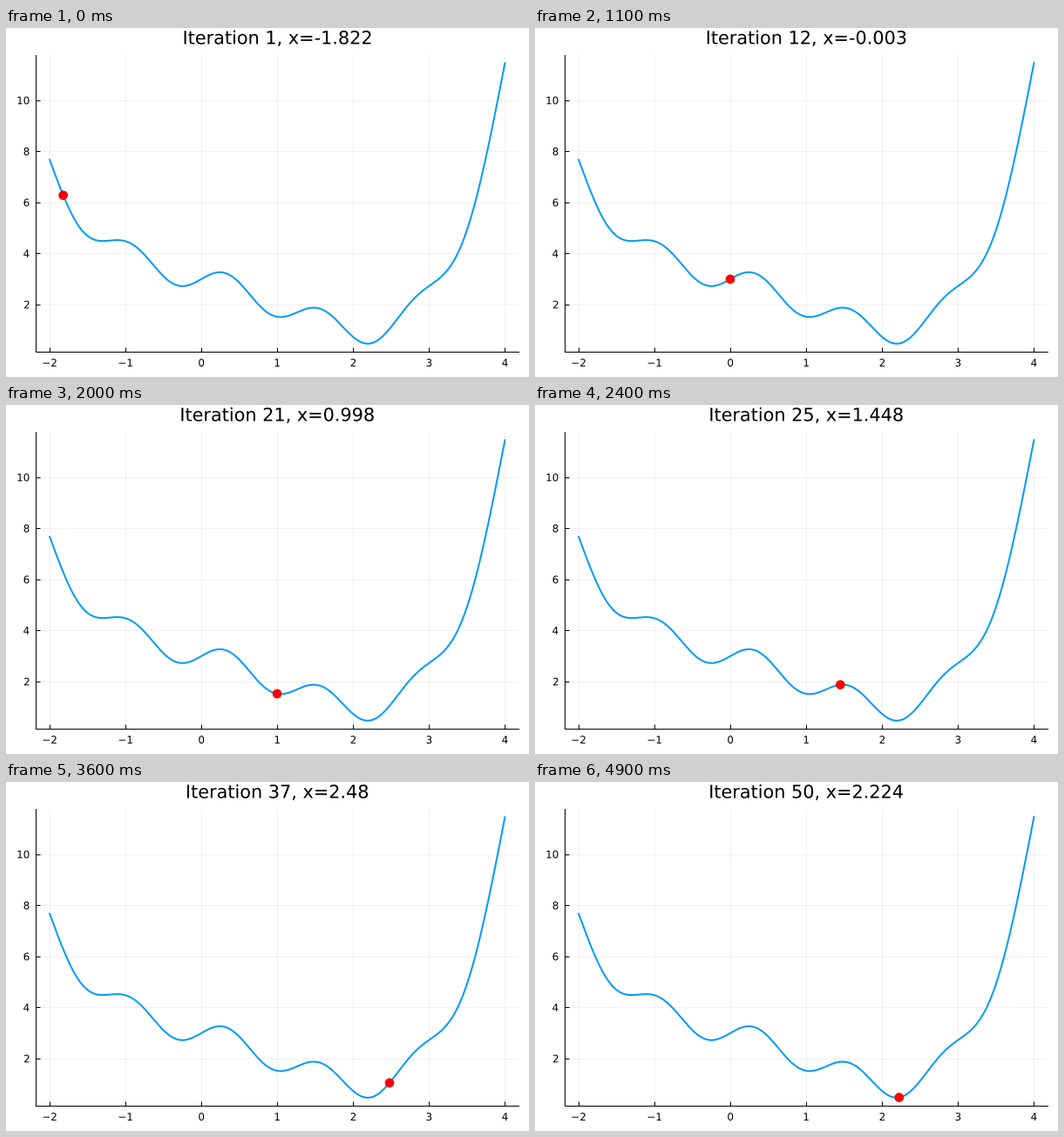
Write a matplotlib script that moves like this. It is 600 px wide and 400 px high and loops after 5000 ms.

```python
import numpy as np
import matplotlib.pyplot as plt
from matplotlib.animation import FuncAnimation
from matplotlib.patches import Ellipse, PathPatch
from matplotlib.textpath import TextPath
from matplotlib.transforms import Affine2D

WIDTH, HEIGHT, DPI = 600, 400, 100
PX = 72 / DPI  # one pixel in points
STEPS, INTERVAL = 50, 100
RATE, MOMENTUM, START = 0.01, 0.9, -1.9
LEFT, RIGHT, TOP, BOTTOM = 34.45, 588.05, 30.63, 371.43
TICK_SIZE, TITLE_SIZE, DOT_SIZE = 11.9, 20.8, 10.7


def f(x):
    return 0.1 * x**4 - 0.2 * x**3 - 0.1 * x**2 - 0.8 * x + 3 + 0.5 * np.sin(5 * x)


def slope(x):
    return 0.4 * x**3 - 0.6 * x**2 - 0.2 * x - 0.8 + 2.5 * np.cos(5 * x)


def descend():
    """Gradient descent with momentum; returns the position after each step."""
    x, v, path = START, 0.0, []
    for _ in range(STEPS):
        v = MOMENTUM * v - RATE * slope(x)
        x += v
        path.append(float(x))
    return path


def widen(values, share=0.03):
    low, high = values.min(), values.max()
    margin = share * (high - low)
    return low - margin, high + margin


fig = plt.figure(figsize=(WIDTH / DPI, HEIGHT / DPI), dpi=DPI, facecolor="white")
ax = fig.add_axes([LEFT / WIDTH, 1 - BOTTOM / HEIGHT,
                   (RIGHT - LEFT) / WIDTH, (BOTTOM - TOP) / HEIGHT])
pixels = Affine2D().scale(1 / WIDTH, -1 / HEIGHT).translate(0, 1) + fig.transFigure


def text_outline(x, y, text, size, align=0.5):
    """Glyph outlines on the baseline y; align 0.5 centres at x, 1 ends at x."""
    path = TextPath((0, 0), text, size=size, prop={"family": "DejaVu Sans"})
    box = path.get_extents()
    shift = x - box.x0 - align * box.width
    return path.transformed(Affine2D().scale(1, -1).translate(shift, y))


def add_text(*args, **kwargs):
    patch = PathPatch(text_outline(*args, **kwargs), facecolor="black",
                      linewidth=0, snap=False, transform=pixels)
    return fig.add_artist(patch)


xs = np.linspace(-2, 4, 601)
xlim, ylim = widen(xs), widen(f(xs))
x_scale = (RIGHT - LEFT) / (xlim[1] - xlim[0])
y_scale = (BOTTOM - TOP) / (ylim[1] - ylim[0])
xticks, yticks = range(-2, 5), range(2, 11, 2)

ax.set(xlim=xlim, ylim=ylim, xticks=xticks, yticks=yticks)
ax.set_axisbelow(True)
ax.grid(color="black", alpha=0.06, linewidth=PX)
ax.tick_params(direction="in", length=5 * PX, width=PX,
               labelbottom=False, labelleft=False)
ax.spines[["top", "right"]].set_visible(False)
ax.spines[["left", "bottom"]].set_linewidth(PX)

for t in xticks:
    add_text(LEFT + (t - xlim[0]) * x_scale, 387.9,
             str(t).replace("-", "\u2212"), TICK_SIZE)
for t in yticks:
    add_text(26.5, BOTTOM - (t - ylim[0]) * y_scale + 4.4,
             str(t), TICK_SIZE, align=1)

ax.plot(xs, f(xs), color="#009AFA", linewidth=2 * PX)
dot = ax.add_patch(Ellipse((0, 0), DOT_SIZE / x_scale, DOT_SIZE / y_scale,
                           facecolor="red", linewidth=0, zorder=5))
title = add_text(0, 0, "Iteration", TITLE_SIZE)
path = descend()


def update(i):
    x = path[i]
    dot.set_center((x, f(x)))
    text = f"Iteration {i + 1}, x={round(x, 3)}"
    title.set_path(text_outline((LEFT + RIGHT) / 2 + 0.3, 18.4, text, TITLE_SIZE))
    return dot, title


anim = FuncAnimation(fig, update, frames=STEPS, interval=INTERVAL,
                     repeat=True, repeat_delay=0)
plt.show()
```
